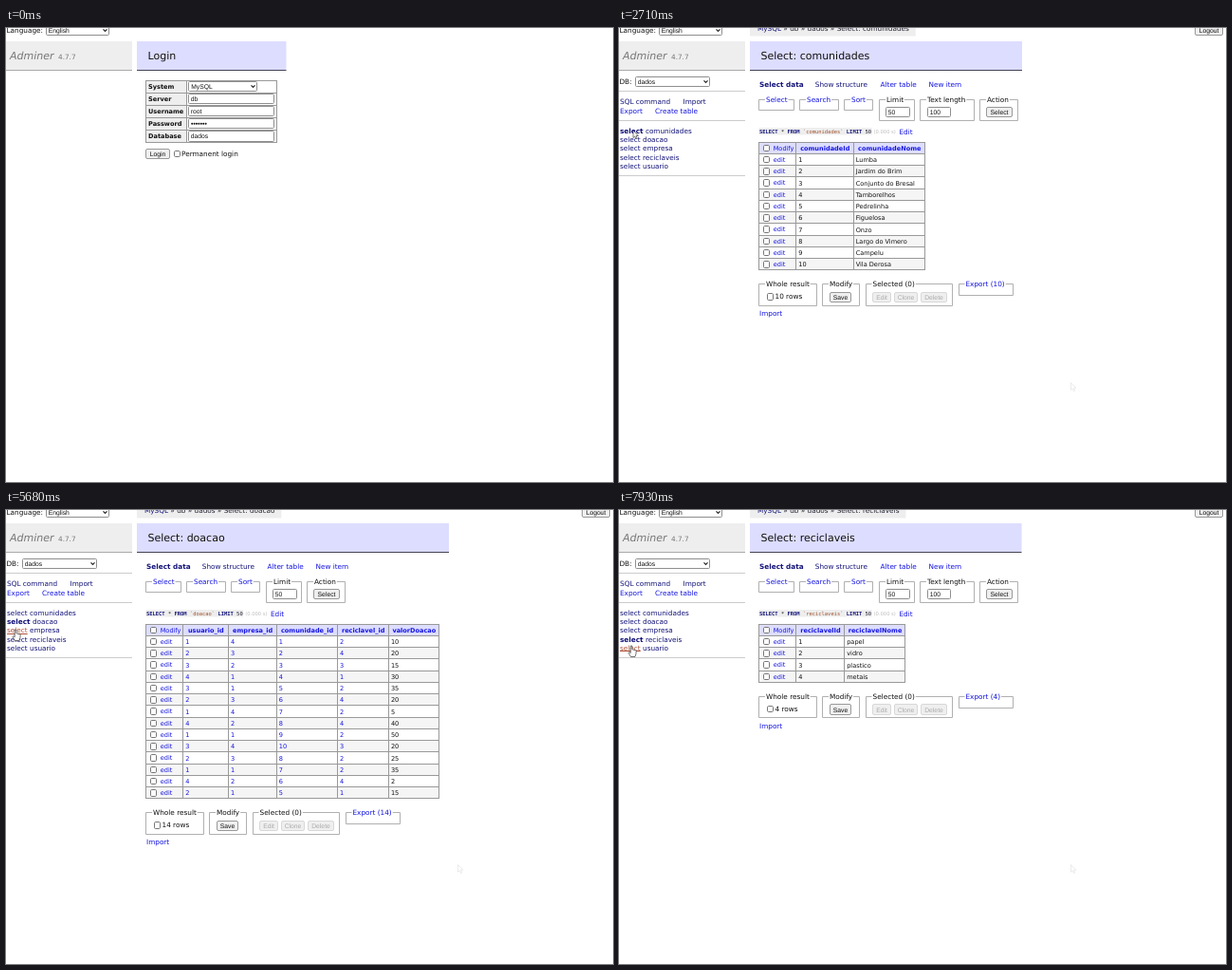
Write an HTML page with a canvas that moves like this. It is 640 by 478 pixels and loops after 8000 ms.

```html
<!DOCTYPE html>
<html lang="en">
<head>
<meta charset="utf-8">
<title>Database admin</title>
<style>
html, body { margin: 0; width: 100%; height: 100%; overflow: hidden; background: #fff; }
canvas { display: block; }
</style>
</head>
<body>
<canvas id="stage" width="640" height="478"></canvas>
<script>
const ctx = document.getElementById('stage').getContext('2d');
const LOOP = 8000;
const SANS = '"DejaVu Sans", sans-serif';
const ARIAL = '"Liberation Sans", sans-serif';
const MONO = '"DejaVu Sans Mono", monospace';
const BODY = 7.3, CELL = 6.57, TITLE = 11;
const INK = '#111', BLUE = '#1515e0', NAVY = '#14147a', GREY = '#999', HEAD = '#ddf', PALE = '#eee';
const DB = 'dados';
const TABLES = ['comunidades', 'doacao', 'empresa', 'reciclaveis', 'usuario'];

// ---- drawing helpers; y of text is the middle of its capitals ----
function text(s, x, y, color = INK, size = BODY, style = '', family = SANS, align = 'left') {
  ctx.font = `${style} ${size}px ${family}`;
  ctx.textAlign = align;
  ctx.fillStyle = color;
  ctx.fillText(s, x, y + size * 0.365);
  return ctx.measureText(s).width;
}
function fill(x, y, w, h, color) {
  ctx.fillStyle = color;
  ctx.fillRect(x, y, w, h);
}
function hline(x1, x2, y, color = GREY) { fill(x1, Math.floor(y), x2 - x1, 1, color); }
function vline(x, y1, y2, color = GREY) { fill(Math.floor(x), y1, 1, y2 - y1, color); }
function box(x1, y1, x2, y2, stroke = '#aaa', inside, r = 0) {
  const x = Math.floor(x1) + 0.5, y = Math.floor(y1) + 0.5;
  ctx.beginPath();
  ctx.roundRect(x, y, Math.round(x2) - x - 0.5, Math.round(y2) - y - 0.5, r);
  if (inside) { ctx.fillStyle = inside; ctx.fill(); }
  ctx.strokeStyle = stroke;
  ctx.lineWidth = 1;
  ctx.stroke();
}
function button(s, x1, x2, y, off = false, hot = false) {
  box(x1, y - 5, x2, y + 6, off ? '#d8d8d8' : '#999', hot ? '#e0e0e0' : '#efefef', 1.5);
  text(s, (x1 + x2) / 2, y + 0.3, off ? '#aaa' : INK, 6.76, '', ARIAL, 'center');
}
function input(s, x1, x2, y) {
  box(x1, y - 5, x2, y + 6, '#8e8e8e', '#fff', 1);
  text(s, x1 + 2.7, y + 0.3, INK, 6.76, '', ARIAL);
}
function select(s, x1, x2, y) {
  input(s, x1, x2, y);
  ctx.strokeStyle = '#222';
  ctx.lineWidth = 1.2;
  ctx.beginPath();
  ctx.moveTo(x2 - 6.5, y - 0.7);
  ctx.lineTo(x2 - 4.5, y + 1.3);
  ctx.lineTo(x2 - 2.5, y - 0.7);
  ctx.stroke();
}
function check(x, y) { box(x, y - 3, x + 7, y + 4, '#777', '#fff', 1.2); }
function fieldset(s, x1, x2, y1, y2, color = INK) {
  box(x1 - 0.5, y1, x2, y2, '#b0b0b0');
  ctx.font = `${BODY}px ${SANS}`;
  fill(x1 + 6, y1 - 2, ctx.measureText(s).width + 2, 5, '#fff');
  text(s, x1 + 7, y1, color);
}

// ---- shared page parts ----
function language() {
  text('Language:', 0.5, 2.5);
  select('English', 42, 109, 2);
}
function crumbs(last) {
  const first = 'MySQL', rest = ' » db » ' + last;
  ctx.font = `${BODY}px ${SANS}`;
  fill(138, 0, ctx.measureText(first + rest).width + 15, 8.5, PALE);
  const w = text(first, 146, 0.5, NAVY);
  text(rest, 146 + w, 0.5, '#223');
}
function title(s, right) {
  fill(138, 14, right - 138, 30, HEAD);
  hline(138, right, 44, '#445');
  text(s, 149.5, 29.3, INK, TITLE);
}
function brand() {
  fill(0, 14, 133, 30, PALE);
  hline(0, 133, 44, '#aaa');
  text('Adminer', 4, 29.3, '#777', TITLE, 'italic');
  text('4.7.7', 55, 30.8, '#777', BODY);
}
function sidebar(active, hover) {
  brand();
  button('Logout', 607, 637, 2);
  text('DB:', 0.5, 56);
  select(DB, 17, 96, 56);
  text('SQL command', 1, 77.5, NAVY);
  text('Import', 67.5, 77.5, NAVY);
  text('Export', 1, 87, BLUE);
  text('Create table', 38, 87, BLUE);
  [66, 97, 155].forEach(y => hline(0, 133, y, '#ccc'));
  TABLES.forEach((name, i) => {
    const y = 108.3 + i * 9.2, hot = i === hover;
    const w = text('select', 1, y, hot ? '#b0543c' : NAVY, BODY, i === active ? 'bold' : '');
    if (hot) hline(1, 1 + w, y + 3.6, '#b0543c');
    text(name, 1 + w + BODY * 0.318, y, NAVY);
  });
}
function grid(xs, ys) {
  const left = xs[0] - 0.5, right = xs[xs.length - 1] - 0.5;
  ys.forEach(y => hline(Math.floor(left), Math.floor(right) + 1, y));
  xs.forEach(x => vline(x - 0.5, Math.floor(ys[0]), Math.floor(ys[ys.length - 1])));
}
function hoverRow(p, x1, x2, top, step) {
  return p.x > x1 && p.x < x2 ? Math.floor((p.y - top) / step) : -1;
}

// ---- pages ----
function loginPage(p, t) {
  language();
  brand();
  title('Login', 295.5);
  fill(147, 55, 43, 66, PALE);
  grid([147.5, 190.5, 285.5], [55, 68, 81, 94, 107, 120]);
  ['System', 'Server', 'Username', 'Password', 'Database'].forEach((s, i) =>
    text(s, 150, 61.5 + i * 13.1, INK, CELL, 'bold'));
  select('MySQL', 192.5, 265, 61);
  ['db', 'root', '', DB].forEach((s, i) => input(s, 192, 283, 74 + i * 13.2));
  for (let i = 0; i < 7; i++) {
    ctx.beginPath();
    ctx.arc(196.2 + i * 2.4, 100.8, 1, 0, 7);
    ctx.fillStyle = INK;
    ctx.fill();
  }
  button('Login', 147, 173, 132, false, t > 850);
  check(177, 132);
  text('Permanent login', 185, 132);
}

function databasePage(p, t) {
  language();
  crumbs('Database: ' + DB);
  title('Database: ' + DB, 595);
  if (t >= 1330) sidebar(-1, p.kind);
  text('Alter database', 148, 59.7, BLUE);
  text('Database schema', 214, 59.7, BLUE);
  text('Privileges', 292, 59.7, BLUE);
  text('Tables and views', 148, 80, INK, 9.5);
  fieldset('Search data in tables (5)', 148, 283, 96.8, 119);
  input('', 154, 245, 110);
  button('Search', 247, 277, 110);

  const xs = [148, 162, 217, 247, 319.5, 368.5, 420, 460, 520, 543.5, 585];
  const top = 138.5, step = 12.2, hot = hoverRow(p, 148, 584, top, step);
  fill(148, 126, 436, 12, HEAD);
  TABLES.forEach((_, i) => {
    if (i === hot || i % 2) fill(148, top + i * step, 436, step, i === hot ? PALE : '#f5f5f5');
  });
  fill(162, top, 55, 72, PALE);
  grid(xs, [126, ...TABLES.map((_, i) => top + i * step), 199.5]);
  grid(xs.slice(0, 8), [199.5, 210]);
  check(152, 132);
  text('Table', 189.5, 132.5, INK, CELL, 'bold', SANS, 'center');
  ['Engine', 'Collation', 'Data Length', 'Index Length', 'Data Free', 'Auto Increment', 'Rows', 'Comment']
    .forEach((s, i) => {
      const x = xs[i + 2] + 2;
      const w = text(s, x, 133.3, INK, CELL);
      text('?', x + w + 0.2, 130.8, BLUE, 5.2);
    });
  TABLES.forEach((s, i) => {
    const y = top + (i + 0.5) * step;
    check(152, y);
    text(s, 165, y, NAVY, CELL, 'bold');
    [366.5, 418, 458.3, 518.3, 542].forEach((x, k) =>
      text('?', x, y, k < 4 ? BLUE : NAVY, CELL, '', SANS, 'right'));
  });
  text('5 in total', 165, 205.3, INK, CELL, 'bold');
  text('utf8mb4_0900_ai_ci', 249, 205.3, INK, CELL);

  fieldset('Selected (0)', 148, 444, 225.5, 265);
  [['Analyze', 154, 187], ['Optimize', 190, 224], ['Check', 227, 254], ['Repair', 257, 285],
   ['Truncate', 288, 322], ['Drop', 324, 348]].forEach(b => button(...b, 239, true));
  text('Move to other database:', 154.5, 255);
  select(DB, 247, 326, 255);
  button('Move', 329, 353, 255, true);
  button('Copy', 356, 380, 255, true);
  check(384, 255);
  text('overwrite', 392, 255);
  text('Create table', 148, 279, BLUE);
  text('Create view', 206, 279, BLUE);
  text('Routines', 148, 299.5, INK, 9.5);
  text('Create procedure', 148, 315.7, BLUE);
  text('Create function', 222, 315.7, BLUE);
  text('Events', 148, 336, INK, 9.5);
  text('Create event', 148, 352, BLUE);
}

const VIEWS = {
  comunidades: {
    right: 425, xs: [148, 187, 247.5, 323], heads: ['comunidadeId', 'comunidadeNome'], links: [],
    rows: ['Lumba', 'Jardim do Brim', 'Conjunto do Bresal', 'Tamborelhos', 'Pedrelinha', 'Figuelosa',
      'Onzo', 'Largo do Vimero', 'Campelu', 'Vila Derosa'].map((s, i) => [i + 1, s])
  },
  doacao: {
    right: 467, xs: [148, 187, 234.7, 285.5, 349.7, 403.7, 457], short: true, links: [0, 1, 2, 3],
    heads: ['usuario_id', 'empresa_id', 'comunidade_id', 'reciclavel_id', 'valorDoacao'],
    rows: ('1 4 1 2 10,2 3 2 4 20,3 2 3 3 15,4 1 4 1 30,3 1 5 2 35,2 3 6 4 20,1 4 7 2 5,' +
      '4 2 8 4 40,1 1 9 2 50,3 4 10 3 20,2 3 8 2 25,1 1 7 2 35,4 2 6 4 2,2 1 5 1 15')
      .split(',').map(r => r.split(' '))
  },
  empresa: {
    right: 640, xs: [148, 187, 234.5, 290.5, 384, 436.5, 545.5, 607.5, 704], links: [4],
    heads: ['empresaId', 'empresaCnpj', 'empresaNome', 'empresaCEP', 'empresaEmail', 'empresaSenha', 'empresaCadastro'],
    rows: [
      [1, '123456789', 'Vasto Reuso Novo', '00050-030', 'vastoreusonovo@mail.test'],
      [2, '234567891', 'RENOVALUDE', '00095-000', 'renovalude@ex.test'],
      [3, '345678912', 'T.L. MesurÃ£o Reciclagem', '00780-070', 'mesuraoreciclagem@mail.test'],
      [4, '456789123', 'Nucleo de Reciclagem Zul', '00530-220', 'sac@nzreciclagem.example']
    ].map(r => [...r, '123', '2020-06-10'])
  },
  reciclaveis: {
    right: 424.5, xs: [148, 187, 238, 302], heads: ['reciclavelId', 'reciclavelNome'], links: [],
    rows: ['papel', 'vidro', 'plastico', 'metais'].map((s, i) => [i + 1, s])
  }
};

function query(name) {
  const parts = [['SELECT', NAVY, 'bold'], [' * ', INK, ''], ['FROM', NAVY, 'bold'],
    [' `' + name + '`', '#a0522d', ''], [' LIMIT', NAVY, 'bold'], [' 50', '#223', '']];
  const size = 5.45, adv = 3.28;
  const end = 148 + adv * parts.reduce((n, q) => n + q[0].length, 0);
  fill(147.5, 105, end - 147, 7.5, PALE);
  let x = 148;
  for (const [s, color, style] of parts) {
    text(s, x, 109.3, color, size, style, MONO);
    x += s.length * adv;
  }
  text('(0.000 s)', end + 2.5, 109.3, '#bbb', 5.2);
  text('Edit', end + 29.3, 109, BLUE);
}

function tablePage(name, p) {
  const v = VIEWS[name], n = v.rows.length;
  language();
  crumbs(DB + ' » Select: ' + name);
  title('Select: ' + name, v.right);
  sidebar(TABLES.indexOf(name), p.kind);
  text('Select data', 148, 59.7, NAVY, BODY, 'bold');
  text('Show structure', 206.8, 59.7, NAVY);
  text('Alter table', 275.5, 59.7, BLUE);
  text('New item', 326.5, 59.7, BLUE);
  fieldset('Select', 148, 185, 75, 87, BLUE);
  fieldset('Search', 191, 232, 75, 87, BLUE);
  fieldset('Sort', 238, 268, 75, 87, BLUE);
  fieldset('Limit', 275, 312, 75, 98);
  input('50', 281, 307, 88);
  let ax = 318;
  if (!v.short) {
    fieldset('Text length', 318, 375, 75, 98);
    input('100', 325, 350, 88);
    ax = 381;
  }
  fieldset('Action', ax, ax + 40, 75, 98);
  button('Select', ax + 6, ax + 34, 88);
  query(name);

  const top = 132.3, step = 12.25, end = top + n * step, x1 = v.xs[0], x2 = v.xs[v.xs.length - 1];
  const hot = hoverRow(p, x1, x2, top, step);
  fill(x1, 120.5, x2 - x1 - 1, 12, HEAD);
  v.rows.forEach((_, i) => {
    if (i === hot || i % 2) fill(x1, top + i * step, x2 - x1 - 1, step, i === hot ? PALE : '#f5f5f5');
  });
  grid(v.xs, [120.5, ...v.rows.map((_, i) => top + i * step), end]);
  check(152, 126);
  text('Modify', 162.7, 126.2, BLUE, CELL);
  v.heads.forEach((s, i) =>
    text(s, (v.xs[i + 1] + v.xs[i + 2]) / 2, 126.5, BLUE, CELL, 'bold', SANS, 'center'));
  v.rows.forEach((r, i) => {
    const y = top + (i + 0.5) * step;
    check(152, y);
    text('edit', 162.7, y, BLUE, CELL);
    r.forEach((s, k) => text(s, v.xs[k + 1] + 2.2, y + 0.2, v.links.includes(k) ? BLUE : INK, CELL));
  });

  const y = end + 15;
  fieldset('Whole result', 148, 209, y, y + 23);
  check(156, y + 13);
  text(n + ' rows', 164.5, y + 13);
  fieldset('Modify', 215, 254, y, y + 23);
  button('Save', 222, 245, y + 13.5);
  fieldset('Selected (0)', 260.5, 352, y, y + 23);
  button('Edit', 267, 287, y + 13.5, true);
  button('Clone', 290, 315, y + 13.5, true);
  button('Delete', 318, 346, y + 13.5, true);
  fieldset(`Export (${n})`, 358.5, 416, y, y + 12.5, BLUE);
  text('Import', 148, y + 31, BLUE);
}

// ---- pointer ----
const ARROW = -1, BEAM = -2, NONE = -3; // 0 and up: hand over that sidebar item
const PATH = [
  [0, 541, 437, NONE], [70, 541, 437, ARROW], [250, 478, 373, ARROW], [870, 161, 128, ARROW],
  [1090, 161, 128, ARROW], [1250, 163, 134, ARROW], [1400, 163, 134, ARROW], [1700, 140, 160, ARROW],
  [2250, 15, 107, 0], [2560, 15, 108, ARROW], [2800, 15, 108, ARROW], [3200, 155, 133, ARROW],
  [3650, 18, 111, ARROW], [3720, 18, 111, 1], [4030, 18, 111, 1], [4200, 24, 117, BEAM],
  [4280, 45, 127, ARROW], [4900, 316.5, 242, ARROW], [4970, 317, 245, ARROW], [5210, 14, 143, ARROW],
  [5440, 14, 143, ARROW], [5660, 10, 126, 2], [6050, 10, 127, 2], [6210, 10, 133, 3],
  [6440, 10, 131, 3], [7010, 10, 132, ARROW], [7390, 11, 138, 4], [7780, 11, 138, 4], [7930, 13, 143, 4],
  [LOOP, 13, 143, 4]
];
function pointer(t) {
  let i = PATH.length - 2;
  while (PATH[i][0] > t) i--;
  const [t1, x1, y1, kind] = PATH[i], [t2, x2, y2] = PATH[i + 1];
  const k = (t - t1) / (t2 - t1);
  return { x: x1 + (x2 - x1) * k, y: y1 + (y2 - y1) * k, kind };
}
function shape(x, y, points, stroke, inside) {
  ctx.beginPath();
  points.forEach(([dx, dy]) => ctx.lineTo(x + dx, y + dy));
  ctx.closePath();
  ctx.fillStyle = inside;
  ctx.fill();
  ctx.strokeStyle = stroke;
  ctx.lineWidth = 0.7;
  ctx.stroke();
}
function arrow(x, y, stroke) {
  shape(x, y, [[0, 0], [0, 7.6], [1.7, 6], [3, 8.9], [4.2, 8.3], [3, 5.5], [5.4, 5.5]], stroke, '#fff');
}
function drawPointer({ x, y, kind }) {
  if (kind === ARROW) arrow(x, y, '#444');
  else if (kind === BEAM) {
    vline(x - 0.5, y - 4, y + 5, '#222');
    hline(x - 2, x + 2, y - 4.5, '#444');
    hline(x - 2, x + 2, y + 4, '#444');
  } else if (kind >= 0) {
    shape(x, y, [[-0.8, 0], [0.8, 0], [0.9, 3.8], [4.4, 4.6], [5.2, 5.6], [4.9, 8.6], [3.9, 11.5],
      [-0.6, 11.5], [-3, 7.4], [-2.3, 6.5], [-0.8, 7.7]], '#333', '#fff');
  }
}

function render(t) {
  fill(0, 0, 640, 478, '#fff');
  const p = pointer(t);
  if (t < 1250) loginPage(p, t);
  else if (t < 2560) databasePage(p, t);
  else if (t < 4280) tablePage('comunidades', p);
  else if (t < 6210) tablePage('doacao', p);
  else if (t < 7010) tablePage('empresa', p);
  else tablePage('reciclaveis', p);
  if (t > 320) arrow(476.5, 373.5, '#e2e2e2'); // faint trail left behind
  drawPointer(p);
}

ctx.textBaseline = 'alphabetic';
ctx.textRendering = 'geometricPrecision';
const start = performance.now();
function tick() {
  render((performance.now() - start) % LOOP);
  requestAnimationFrame(tick);
}
tick();
</script>
</body>
</html>
```
